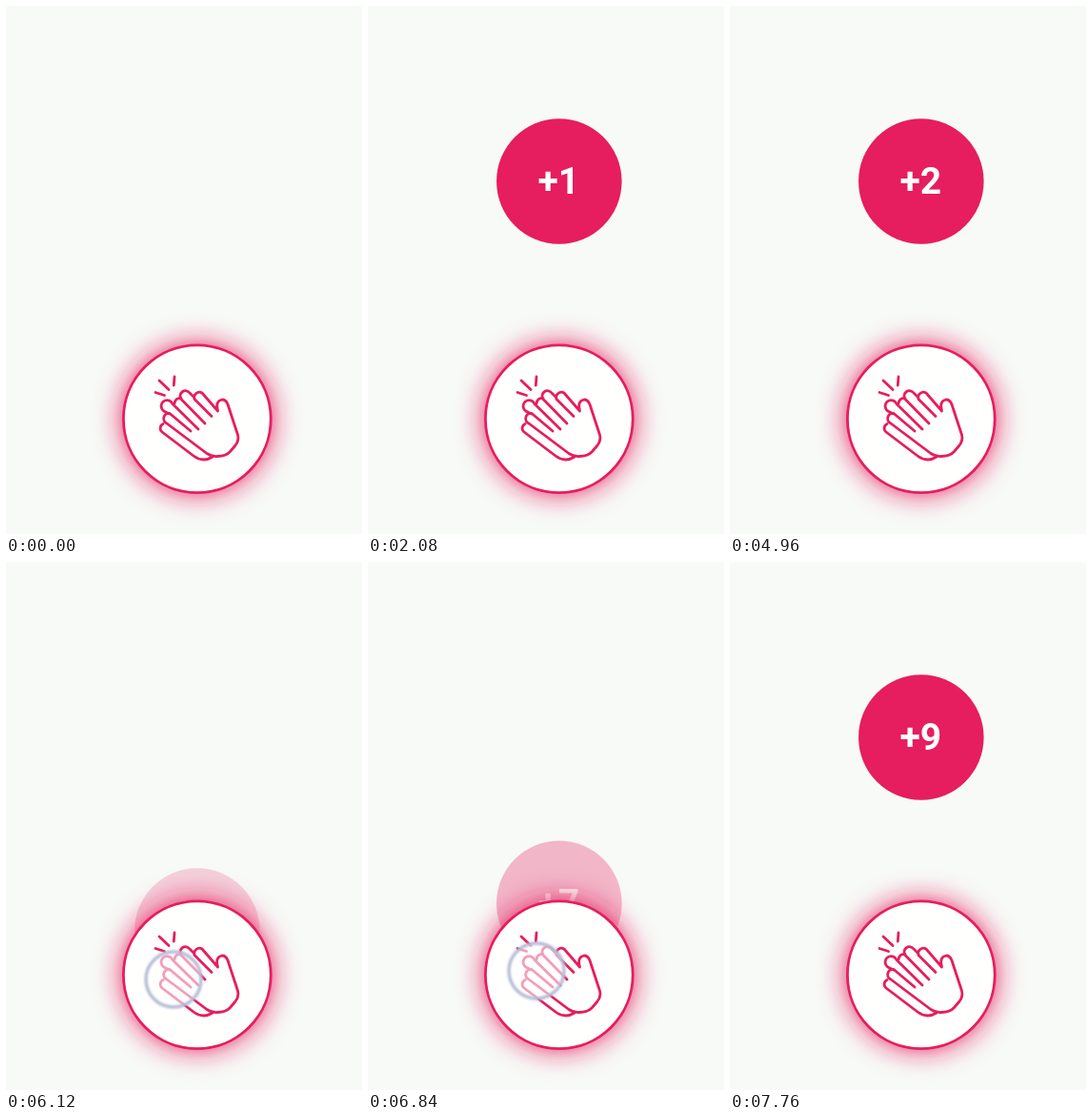
Recreate the animation shown at these times as an HTML page. Size 374x554 px, loop 9840 ms.

```html
<!DOCTYPE html>
<html lang="en">
<head>
<meta charset="utf-8">
<title>Clap button</title>
<style>
  html, body { margin: 0; width: 100%; height: 100%; overflow: hidden; background: #f7faf7; }
  svg { display: block; }
  text { font: 700 39px Roboto, Inter, sans-serif; fill: #fff; text-anchor: middle; }
  .line { fill: none; stroke: #e61d5e; stroke-width: 2.8; stroke-linecap: round; stroke-linejoin: round; }
  .solid { fill: #fffffe; }
</style>
</head>
<body>
<svg width="374" height="554" viewBox="0 0 374 554">
  <defs>
    <filter id="glow" x="-50%" y="-50%" width="200%" height="200%"><feGaussianBlur stdDeviation="14.500"/></filter>
    <filter id="soft" x="-20%" y="-20%" width="140%" height="140%"><feGaussianBlur stdDeviation="1"/></filter>
  </defs>

  <g id="bubble">
    <circle r="65.8" fill="#e61d5e"/>
    <text id="count" x="-.4" y="13"></text>
  </g>

  <circle cx="200.800" cy="433.300" r="78.500" fill="#e61d5e" filter="url(#glow)"/>
  <circle class="line solid" cx="200.800" cy="433.300" r="77.400"/>

  <!-- sparks -->
  <path class="line" d="M157 405.500L166.500 408.500M161 393L171 402.500M177 389L176.300 398"/>
  <!-- back hand -->
  <path class="line" d="M165 438.500A5 5 0 0 0 164 447L197 472Q207 479.500 217 473"/>
  <!-- front hand -->
  <path class="line" d="M216 430.500L198 412.500A5.500 5.500 0 0 1 206 406L222.500 425
    C220.500 418 222 414 227 413Q231 413 233 418L243.500 450Q245 456 241 461L235.500 467.500
    Q231 472.500 222 472.500Q216 473 211 469.500L169 438
    A5.500 5.500 0 0 1 172 427.500L194 446
    M209 438L184 412.500A5.500 5.500 0 0 1 193 406L198 411
    M202 444L175 417.500A6 6 0 0 0 163.500 422Q164 425 172 428
    M177 417Q178 411 184 411.500"/>

  <g id="touch">
    <circle r="29" fill="#fff" fill-opacity=".57"/>
    <circle r="29" fill="none" stroke="#b4bcd8" stroke-width="3.400" filter="url(#soft)"/>
  </g>
</svg>
<script>
const LOOP = 9840, RISE = 400, HOLD = 220, FADE = 80;
// time of each tap and where it lands
const taps = [
  [1360, 173, 428], [3400, 172, 427],
  [5480, 175, 442], [5760, 176, 440], [6046, 176, 438], [6380, 177, 433],
  [6720, 177, 429], [6940, 177, 430], [7130, 177, 431]
];
const $ = id => document.getElementById(id);
const bubble = $('bubble'), count = $('count'), touch = $('touch');
const clamp = v => Math.max(0, Math.min(1, v));

function place(el, x, y, opacity) {
  el.setAttribute('transform', `translate(${x} ${y})`);
  el.setAttribute('opacity', opacity);
}

function draw(t) {
  const n = taps.filter(tap => tap[0] <= t).length;
  if (!n) {
    place(bubble, 201, 433, 0);
    place(touch, 0, 0, 0);
    return;
  }
  const [start, x, y] = taps[n - 1];
  const p = clamp((t - start) / RISE);
  count.textContent = '+' + n;
  place(bubble, 200.8, 433 - 249 * p, p);
  place(touch, x, y, clamp(1 - (t - start - HOLD) / FADE));
}

let begin;
function tick(now) {
  begin ??= now;
  draw((now - begin) % LOOP);
  requestAnimationFrame(tick);
}
draw(0);
requestAnimationFrame(tick);
</script>
</body>
</html>
```
